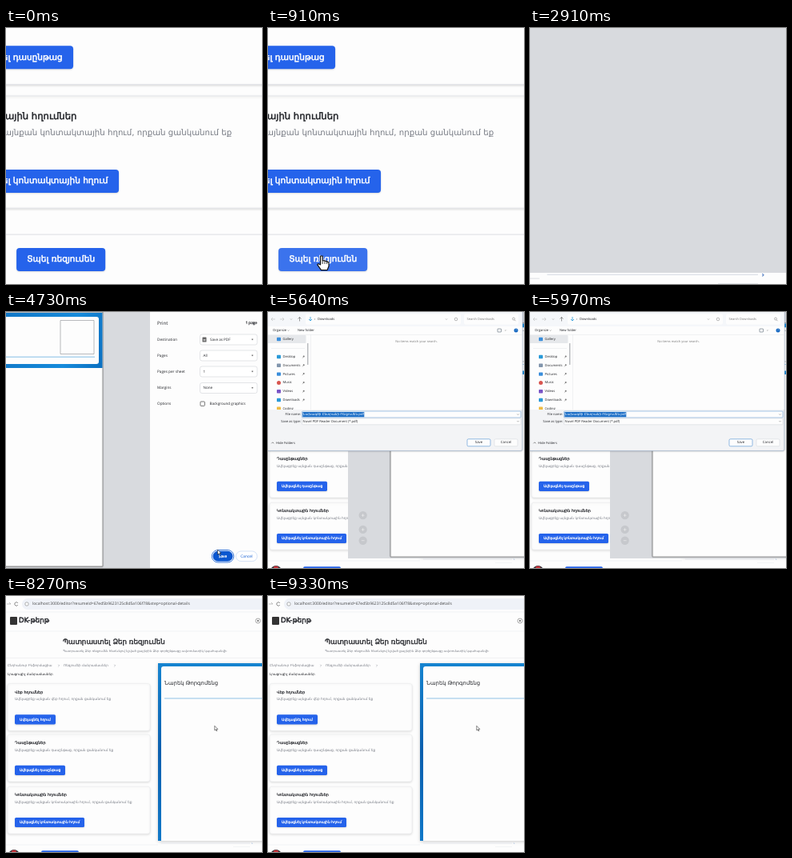
Animation, 320 px wide and 320 px high, one loop 9.36 s. Source, as an HTML page with a canvas:

```html
<!DOCTYPE html>
<html lang="hy">
<head>
<meta charset="utf-8">
<title>Resume export</title>
<style>
html, body { margin: 0; width: 100%; height: 100%; overflow: hidden; background: #fdfdfd; }
canvas { display: block; width: 320px; height: 320px; }
</style>
</head>
<body>
<canvas id="stage"></canvas>
<script>
const LOOP = 9360, BLUE = '#2563eb', INK = '#202227', GREY = '#777b84', LINE = '#e3e5e9', PAPER = '#fdfdfd';
const HY = '"DejaVu Sans", sans-serif', UI = '"Open Sans", "Noto Sans", sans-serif';
const PRINT = { x: 254.7, y: 13.7, zoom: 1.088 };
const canvas = document.getElementById('stage'), g = canvas.getContext('2d');
const dpr = window.devicePixelRatio || 1;
canvas.width = canvas.height = 320 * dpr;

// Keys are [time, ...values]; values ease from one key to the next.
const camera = [
  [0, 38.6, 202.4, 2.375], [2500, 38.6, 202.4, 2.375], [2750, 185, 179.2, 2.375],
  [2950, 185, 179.2, 2.375], [3700, PRINT.x, PRINT.y, PRINT.zoom],
  [4800, PRINT.x, PRINT.y, PRINT.zoom], [5500, 0, 0, 1], [LOOP, 0, 0, 1]
];
const pointer = [
  [0, 110, 345], [900, 66.8, 322.4], [2950, 66.8, 322.4], [3650, 497.8, 286.7],
  [4950, 497.8, 286.7], [6000, 400, 200], [7200, 260.8, 162.3], [LOOP, 260.8, 162.3]
];

function at(keys, t) {
  const i = Math.max(1, keys.findIndex(k => k[0] >= t));
  const a = keys[i - 1], b = keys[i];
  const p = (t - a[0]) / (b[0] - a[0]), e = p * p * (3 - 2 * p);
  return a.slice(1).map((v, n) => v + (b[n + 1] - v) * e);
}

function text(s, x, y, size, { color = INK, font = UI, bold = 0, align = 'left' } = {}) {
  g.font = `${size}px ${font}`;
  g.textAlign = align;
  g.textBaseline = 'middle';
  g.fillStyle = g.strokeStyle = color;
  g.fillText(s, x, y);
  if (bold) {
    g.lineWidth = size * bold;
    g.strokeText(s, x, y);
  }
}
const hy = (s, x, y, size, o) => text(s, x, y, size, { font: HY, ...o });

function box(x, y, w, h, fill, r = 0, stroke, lw = 0.5) {
  g.beginPath();
  g.roundRect(x, y, w, h, r);
  if (fill) { g.fillStyle = fill; g.fill(); }
  if (stroke) { g.strokeStyle = stroke; g.lineWidth = lw; g.stroke(); }
}

function path(points, stroke, lw = 0.6, fill) {
  g.beginPath();
  for (let i = 0; i < points.length; i += 2) g.lineTo(points[i], points[i + 1]);
  if (fill) { g.closePath(); g.fillStyle = fill; g.fill(); }
  g.strokeStyle = stroke;
  g.lineWidth = lw;
  g.lineJoin = 'round';
  g.stroke();
}

function dot(x, y, r, fill, stroke) {
  box(x - r, y - r, 2 * r, 2 * r, fill, r, stroke);
}

const chevron = (x, y, color, d = 1) => path([x - d, y - d / 2, x, y + d / 2, x + d, y - d / 2], color, 0.5);
const next = (x, y, color, d = 1.2) => path([x - d / 2, y - d, x + d / 2, y, x - d / 2, y + d], color, 0.5);

function shadow(blur, dy, color, draw) {
  g.save();
  g.shadowBlur = blur * dpr;
  g.shadowOffsetY = dy * dpr;
  g.shadowColor = color;
  draw();
  g.restore();
}

function button(label, x, y, w, fill = BLUE) {
  shadow(2, 1, '#0002', () => box(x, y, w, 12.2, fill, 1.7));
  hy(label, x + w / 2, y + 6.2, 4.45, { color: '#fff', bold: 0.05, align: 'center' });
}

function card(y, title, what, label, w) {
  shadow(3, 1, '#0002', () => box(2, y - 11, 178, 59, PAPER, 3, LINE, 0.4));
  hy(title, 11, y, 4.9, { bold: 0.04 });
  hy(`Ավելացրեք այնքան ${what}, որքան ցանկանում եք`, 11, y + 8.5, 4.3, { color: GREY });
  button(label, 11, y + 27.7, w);
}

function editor(hover) {
  box(-10, -60, 720, 480, PAPER);

  // Address bar
  box(20, 3, 420, 14, '#eff2f8', 7);
  path([1, 10, 6, 10, 4, 8], '#999');
  g.beginPath();
  g.arc(13, 10, 2.2, 0.6, 5.8);
  g.strokeStyle = '#555';
  g.lineWidth = 0.7;
  g.stroke();
  dot(26, 10, 2.2, '#fff', '#666');
  text('localhost:3000/editor?resumeId=67ed5b9623125c8d5a106f78&step=optional-details', 33, 10, 5, { color: '#444' });
  box(-10, 19.7, 720, 0.6, LINE);

  // Site header
  box(5, 26, 9, 10, '#333', 1);
  hy('DK-թերթ', 16, 31, 8.6, { bold: 0.05 });
  dot(315, 31, 3, PAPER, '#555');
  dot(315, 31, 1, '#555');
  box(-10, 43.7, 720, 0.6, LINE);
  hy('Պատրաստել Ձեր ռեզյումեն', 71, 57.5, 8.7, { bold: 0.04 });
  hy('Պատրաստել Ձեր ռեզյումեն հետևելով նշված քայլերին Ձեր գործընթացը ավտոմատիկ կպահպանվի։',
    71, 68.5, 3.85, { color: GREY });
  box(-10, 77, 720, 0.5, LINE);

  // Breadcrumbs
  hy('Ընդհանուր Ինֆորմացիա', 2, 87, 4.1, { color: GREY });
  next(66, 87, GREY);
  hy('Ռեզյումեի մանրամասներ', 72, 87, 4.1, { color: GREY });
  next(136, 87, GREY);
  hy('Լրացուցիչ մանրամասներ', 2, 98, 4.1);

  card(120.5, 'Վեբ հղումներ', 'վեբ հղում', 'Ավելացնել հղում', 51);
  card(184.1, 'Դասընթացներ', 'դասընթաց', 'Ավելացնել դասընթաց', 63);
  card(249.2, 'Կոնտակտային հղումներ', 'կոնտակտային հղում', 'Ավելացնել կոնտակտային հղում', 87);

  // Preview sheet
  const rim = g.createLinearGradient(0, 84, 0, 306);
  rim.addColorStop(0, '#1684d0');
  rim.addColorStop(0.5, '#0a5fae');
  rim.addColorStop(1, '#0f78c8');
  shadow(4, 1, '#0003', () => box(190, 84, 225, 222, rim));
  box(194, 88, 217, 218, PAPER, [3, 3, 0, 0]);
  hy('Նարեկ Թորգոմենց', 198, 109, 6.8);
  box(198, 127.6, 209, 0.8, '#8fc1e6');

  // Footer
  box(-10, 310.8, 200, 0.5, LINE);
  box(194, 308.8, 111, 0.4, '#d3d8e2');
  next(307.6, 309.2, '#5f86c8', 0.7);
  box(284, 313.5, 21, 0.4, LINE);
  dot(10, 324, 7, '#34343a');
  dot(10, 321, 3.4, '#c8353c');
  button('Տպել ռեզյումեն', 44.1, 318.2, 46.8, hover ? '#3b73ed' : BLUE);
}

function field(y, label, value, icon) {
  text(label, 189, y, 4.7);
  box(242.5, y - 6.5, 71.5, 13, '#fff', 2.5, '#c6c9cf');
  if (icon) {
    box(245.5, y - 3, 5, 6, '#666', 0.6);
    box(246.7, y - 0.5, 2.6, 0.6, '#fff');
    box(246.7, y + 1, 2.6, 0.6, '#fff');
  }
  text(value, icon ? 255 : 246.5, y, 4.6);
  path([307, y - 0.7, 309, y - 0.7, 308, y + 0.7], '#555', 0.2, '#555');
}

function sheet() {
  shadow(1.5, 0.5, '#0004', () => box(-110.6, 0, 231.6, 318, PAPER, 0, '#777', 0.7));
  const rim = g.createLinearGradient(-110, 0, 121, 70);
  rim.addColorStop(0, '#0a5fae');
  rim.addColorStop(0.8, '#168bdb');
  rim.addColorStop(1, '#0b6fc0');
  box(-110, 1, 230.5, 69, rim);
  box(-105, 6, 221, 59, PAPER, 3);
  box(68, 10.5, 42, 42, null, 0, '#8a8d92', 0.6);
  box(-101, 55.7, 212, 0.7, '#5da9de');
}

function printDialog(t) {
  g.save();
  g.translate(PRINT.x, PRINT.y);
  g.scale(1 / PRINT.zoom, 1 / PRINT.zoom);
  box(-168.3, -30, 348.3, 350.2, '#d8dade');
  if (t > 3250) sheet();

  // Zoom controls fade away behind the file picker
  g.globalAlpha = Math.max(0, Math.min(1, (t - 5300) / 200, (6500 - t) / 500));
  [261.5, 281, 296].forEach((y, i) => {
    dot(-148, y, 5.6, '#c6c8cc');
    box(-150, y - 0.3, 4, 0.7, '#eee');
    if (i < 2) box(-148.3, y - 2, 0.7, 4, '#eee');
  });
  g.globalAlpha = 1;

  box(180, -30, 146, 350.2, PAPER);
  text('Print', 189, 14, 6);
  text('1 page', 314, 14, 4.7, { align: 'right', bold: 0.04 });
  field(34.5, 'Destination', 'Save as PDF', true);
  field(54.5, 'Pages', 'All');
  field(74.5, 'Pages per sheet', '1');
  field(95, 'Margins', 'None');
  text('Options', 189, 114.5, 4.7);
  box(243, 112, 5.4, 5.4, '#fff', 0.8, '#555', 0.8);
  text('Background graphics', 254.5, 114.5, 4.6);
  box(257.3, 297.5, 27.5, 15.5, '#fff', 7.7, '#0b57d0', 0.8);
  box(258.6, 298.8, 24.9, 12.9, '#0b57d0', 6.4);
  text('Save', 271, 305.3, 4.8, { color: '#fff', bold: 0.05, align: 'center' });
  box(287.5, 299, 26.5, 12.6, '#fff', 6.3, '#a9c4ee');
  text('Cancel', 300.7, 305.3, 4.8, { color: '#0b57d0', align: 'center' });
  g.restore();
}

function pushButton(label, x, hot) {
  box(x, 158.8, 29, 9, hot ? '#dcecf9' : PAPER, 1.5, hot || label === 'Save' ? '#2a78c8' : '#cfd3d9');
  text(label, x + 14.5, 163.3, 4.3, { align: 'center' });
}

function saveDialog(t) {
  shadow(2, 0.5, '#0003', () => box(-20, -20, 338, 193.5, '#f3f4f6', 2, '#a8bbd2', 0.7));
  box(-20, -19, 337.6, 37, '#f5f7fa');
  box(-20, 18, 337.6, 104, PAPER);

  // Navigation row
  path([4, 9, 9, 9], '#bbb');
  path([6, 7, 4, 9, 6, 11], '#bbb');
  path([15, 9, 20, 9], '#bbb');
  path([18, 7, 20, 9, 18, 11], '#bbb');
  chevron(29, 9, '#777');
  path([39.5, 11.5, 39.5, 6.5], '#555');
  path([37.5, 8.5, 39.5, 6.5, 41.5, 8.5], '#555');
  box(47, 2.5, 194, 13, PAPER, 2);
  path([53, 6, 53, 11], '#2a9ad8', 0.8);
  path([51, 9, 53, 11, 55, 9], '#2a9ad8', 0.8);
  next(58.5, 9, '#777', 0.9);
  text('Downloads', 62, 9, 4.1);
  chevron(223, 9, '#777');
  dot(235, 9, 1.8, null, '#777');
  box(245, 2.5, 68, 13, PAPER, 2);
  text('Search Downloads', 248.5, 9, 4, { color: '#777' });
  dot(307, 8.5, 1.5, null, '#777');
  path([308, 9.7, 309.5, 11.2], '#777');

  // Toolbar
  text('Organize', 6, 23, 4.1);
  chevron(25.5, 23, '#555', 0.9);
  text('New folder', 37, 23, 4.1);
  box(287, 21, 4.5, 4, PAPER, 0.5, '#345');
  chevron(297, 23, '#666', 0.9);
  dot(310, 23, 2.5, '#1769c2');
  text('?', 310, 23.1, 3.6, { color: '#fff', align: 'center' });
  box(-20, 28, 337.6, 0.5, LINE);

  // Folder list
  box(-20, 29, 67.5, 10, '#e6e8eb', 1);
  box(49.3, 39, 1, 27, '#9a9da2', 0.5);
  box(53.5, 28, 0.5, 94, LINE);
  box(4, 45, 42, 0.5, LINE);
  const folders = ['Gallery', 'Desktop', 'Documents', 'Pictures', 'Music', 'Videos', 'Downloads', 'Coding'];
  const tints = ['#3b8edb', '#2a9ad8', '#8296ad', '#3b8edb', '#d8554f', '#7a55c7', '#2a9ad8', '#f0bd45'];
  g.save();
  g.beginPath();
  g.rect(0, 28, 53, 94);
  g.clip();
  folders.forEach((name, i) => {
    const y = i ? 45.2 + i * 10.8 : 34;
    if (name === 'Music') dot(13.5, y, 2.5, tints[i]);
    else box(11, y - 2.2, 5, 4.4, tints[i], 0.7);
    text(name, 18.5, y, 4.1);
    if (i && i < 7) {
      dot(44.7, y - 0.5, 1, '#777');
      path([44.5, y, 42.8, y + 1.6], '#777', 0.5);
    }
  });
  g.restore();
  text('No items match your search.', 185.5, 36.5, 3.95, { color: '#777', align: 'center' });

  // File fields
  text('File name:', 41, 128, 4.1, { align: 'right' });
  box(42.5, 124, 273.5, 8, PAPER, 0.7, '#4c8ccc');
  const file = 'Նախագծի Ընտրանի Ռեզյումեն.pdf';
  g.font = `4.1px ${HY}`;
  box(43.3, 125, g.measureText(file).width + 0.6, 6.2, '#1b6ec7');
  hy(file, 43.6, 128.2, 4.1, { color: '#fff' });
  chevron(312.5, 128, '#555');
  text('Save as type:', 41, 136.7, 4.1, { align: 'right' });
  box(42.5, 133, 273.5, 7.8, PAPER, 0.7, '#cfd3d9');
  text('Nuvel PDF Reader Document (*.pdf)', 43.6, 136.7, 4.1);
  chevron(312.5, 136.7, '#555');
  path([4.3, 164.3, 5.8, 162.8, 7.3, 164.3], '#444');
  text('Hide Folders', 10, 163.8, 4.1);
  pushButton('Save', 249, t > 7000);
  pushButton('Cancel', 283, false);
}

function drawPointer(x, y, hand) {
  g.save();
  g.translate(x, y);
  const shape = hand
    ? [-0.6, 0, 0.5, 0, 0.5, 2.4, 1.7, 2.5, 2.8, 2.9, 3.8, 3.4, 3.8, 5.4, 3, 7.4, -0.2, 7.4, -2.2, 4.6, -1.8, 4, -0.6, 4.6, -0.6, 0]
    : [0, 0, 0, 5.6, 1.3, 4.5, 2.2, 6.5, 3.1, 6.1, 2.2, 4.2, 4, 4.1, 0, 0];
  path(shape, '#111', 0.5, '#fff');
  if (hand) for (const fx of [0.5, 1.7, 2.8]) path([fx, 2.6, fx, 4.2], '#111', 0.35);
  g.restore();
}

function draw(now) {
  const t = now % LOOP;
  const [x, y, zoom] = at(camera, t);
  const hover = t > 700 && t < 2450;
  g.setTransform(dpr, 0, 0, dpr, 0, 0);
  g.textRendering = 'geometricPrecision';
  g.fillStyle = PAPER;
  g.fillRect(0, 0, 320, 320);
  g.scale(zoom, zoom);
  g.translate(-x, -y);
  editor(hover);
  if (t > 2450 && t < 7750) printDialog(t);
  if (t > 5250 && t < 7700) saveDialog(t);
  drawPointer(...at(pointer, t), hover);
  requestAnimationFrame(() => draw(performance.now()));
}
draw(0);
</script>
</body>
</html>
```
